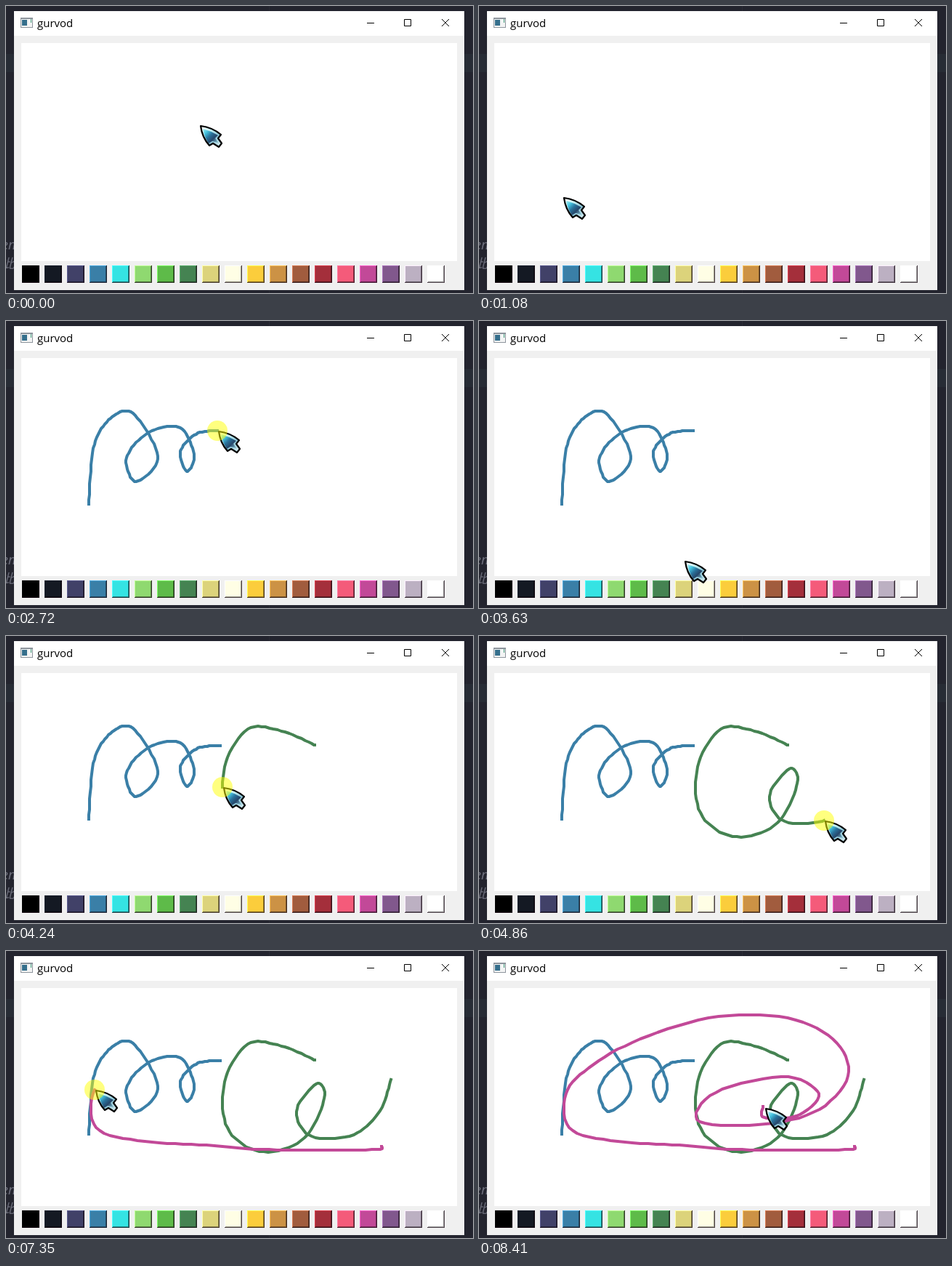
An HTML page with a canvas for the animation above (8.81 s loop, 643x395 px).

```html
<!DOCTYPE html>
<html>
<head>
<meta charset="utf-8">
<style>
html, body { margin: 0; width: 100%; height: 100%; overflow: hidden; background: #23242e; }
canvas { display: block; }
</style>
</head>
<body>
<canvas id="stage" width="643" height="395"></canvas>
<script>
const g = document.getElementById('stage').getContext('2d');
const LOOP = 8810, TICK = 77.1; // the screen refreshes once per tick
const LAG = 60;                 // pause between pressing and drawing
const COLORS = ['#000000', '#141923', '#414168', '#3a7fa7', '#35e3e3', '#8fd970', '#5ebb49',
  '#458352', '#dcd37b', '#fffee5', '#fbcd3c', '#cc9245', '#a15c3e', '#a42f3b', '#f45b7a',
  '#c24998', '#81588d', '#bcb0c2', '#ffffff'];

// The pointer arrives, presses, follows a path (drawing if it has a pen) and releases
const act = (arrive, press, release, path, pen) =>
  ({ arrive, press, release, pen, pts: path.split(' ').map(p => p.split(',').map(Number)) });
const ACTS = [
  act(0, 60, 60, '266,164'),
  act(500, 540, 700, '128,370'),
  act(1170, 1382, 2778, '114,252 121,172 145,133 176,128 209,187 179,221 166,188 197,153 ' +
    '240,147 259,185 249,207 240,180 263,155 295,151', COLORS[3]),
  act(3190, 3320, 3521, '251,370'),
  act(3900, 3900, 5086, '425,150 380,131 333,128 301,180 305,244 350,276 408,260 438,205 ' +
    '428,182 400,220 420,255 478,253 515,220 530,177', COLORS[7]),
  act(5460, 5860, 5930, '483,370'),
  act(6260, 6330, 6480, '490,370'),
  act(6690, 6785, 8387, '517,269 510,273 430,274 350,273 270,267 190,262 126,245 120,196 ' +
    '155,158 222,121 323,91 425,92 490,124 508,172 465,220 385,239 302,234 325,195 420,173 ' +
    '468,196 440,226 393,229 391,214', COLORS[15]),
  act(8400, LOOP, LOOP, '393,216')
];

const clamp = u => Math.min(1, Math.max(0, u));
const smooth = u => u * u * (3 - 2 * u);
const spline = (a, b, c, d, u) =>
  b + u / 2 * (c - a + u * (2 * a - 5 * b + 4 * c - d + u * (3 * (b - c) + d - a)));

function along({ press, release, pts }, t) {
  const last = pts.length - 1;
  const s = clamp((t - press - LAG) / (release - press - 2 * LAG)) * last;
  const i = Math.max(0, Math.min(Math.floor(s), last - 1));
  const p = k => pts[Math.min(last, Math.max(0, k))];
  return [0, 1].map(k =>
    Math.round(spline(p(i - 1)[k], p(i)[k], p(i + 1)[k], p(i + 2)[k], s - i)));
}

function pointerAt(t) {
  const n = ACTS.findIndex(a => t < a.release);
  const now = ACTS[n];
  if (!n || t >= now.arrive) return along(now, t);
  const prev = ACTS[n - 1], a = prev.pts[prev.pts.length - 1], b = now.pts[0];
  const u = smooth((t - prev.release) / (now.arrive - prev.release));
  return a.map((v, k) => Math.round(v + (b[k] - v) * u));
}

function rect(color, x, y, w, h) {
  g.fillStyle = color;
  g.fillRect(x, y, w, h);
}

function label(text, x, y, color, font) {
  g.font = font;
  g.fillStyle = color;
  g.fillText(text, x, y);
}

// Lines along the top and left (side 0) or bottom and right (side 1), inset by d
function edge(color, x, y, side, d) {
  const far = side * (23 - 2 * d);
  rect(color, x + d, y + d + far, 24 - 2 * d, 1);
  rect(color, x + d + far, y + d + 1 - side, 1, 23 - 2 * d);
}

function drawSwatch(color, i) {
  const x = 22 + 31 * i, y = 357;
  rect(color, x, y, 24, 24);
  g.globalCompositeOperation = 'color-dodge';
  edge('#444', x, y, 0, 0);
  g.globalCompositeOperation = 'source-over';
  edge('rgba(0,0,0,.4)', x, y, 1, 1);
  edge('rgba(20,5,15,.75)', x, y, 1, 0);
}

function drawWindow() {
  rect('#23242e', 0, 0, 643, 395);
  rect('#272c35', 0, 66, 643, 25);
  rect('#2a2c36', 362, 0, 1, 395);
  label('en', -6, 335, '#6c6e7b', 'italic 18px "Noto Sans", sans-serif');
  label('此', -6, 361, '#6c6e7b', 'italic 18px "Noto Sans CJK SC", "Noto Sans CJK", sans-serif');

  rect('#f0f0f0', 11, 7, 620, 384);
  rect('#fff', 11, 7, 620, 34);
  rect('#fff', 21, 51, 600, 300);

  rect('#8d949c', 20, 16, 17, 14);
  rect('#f3f4f4', 21, 18, 15, 11);
  rect('#356f8c', 22, 19, 7, 8);
  rect('#3d9a78', 34, 18, 1, 5);
  label('gurvod', 43, 29, '#000', '15px "Open Sans", sans-serif');

  g.strokeStyle = '#000';
  g.lineWidth = 1;
  g.lineCap = 'butt';
  g.stroke(new Path2D('M497 23.5h10M548.5 18.5h9v9h-9zM600 18l10 10M610 18l-10 10'));

  COLORS.forEach(drawSwatch);
}

function drawStroke(line, t) {
  g.beginPath();
  for (let s = line.press; s < Math.min(t, line.release); s += 9) g.lineTo(...along(line, s));
  g.lineTo(...along(line, t));
  g.strokeStyle = line.pen;
  g.lineWidth = 4;
  g.lineCap = 'square';
  g.lineJoin = 'round';
  g.stroke();
}

const ARROW = new Path2D('M1 1Q17 3 29 13L25 18 30 25 26 30 18 25 13 28Q3 17 1 1Z');
const CORE = new Path2D('M4 5Q15 8 25 14L21 18 25 24 17 22 12 25Q6 16 4 5Z');
function shade(from, to, ...stops) {
  const s = g.createLinearGradient(from, from, to, to);
  stops.forEach((c, i) => s.addColorStop(i / (stops.length - 1), c));
  return s;
}
const ARROW_FILL = shade(2, 28, '#fff', '#c5f0f3', '#8ac5d6', '#d9edf0');
const CORE_FILL = shade(5, 23, '#a5f0f2', '#45c3df', '#2a739c', '#27486c', '#6fa9bd');

function drawPointer(x, y) {
  g.save();
  g.translate(x + 1, y);
  g.fillStyle = ARROW_FILL;
  g.fill(ARROW);
  g.fillStyle = CORE_FILL;
  g.fill(CORE);
  g.strokeStyle = '#000';
  g.lineWidth = 2.2;
  g.lineJoin = 'round';
  g.stroke(ARROW);
  g.restore();
}

function draw(t) {
  drawWindow();
  for (const a of ACTS) if (a.pen && t >= a.press) drawStroke(a, t);
  const [x, y] = pointerAt(t);
  drawPointer(x, y);
  if (ACTS.some(a => a.press <= t && t < a.release)) {
    g.fillStyle = 'rgba(255,255,0,.5)';
    g.beginPath();
    g.arc(x, y, 14, 0, 7);
    g.fill();
  }
}

function frame() {
  const now = performance.now() % LOOP;
  draw(Math.floor(now / TICK) * TICK);
  requestAnimationFrame(frame);
}
frame();
</script>
</body>
</html>
```
